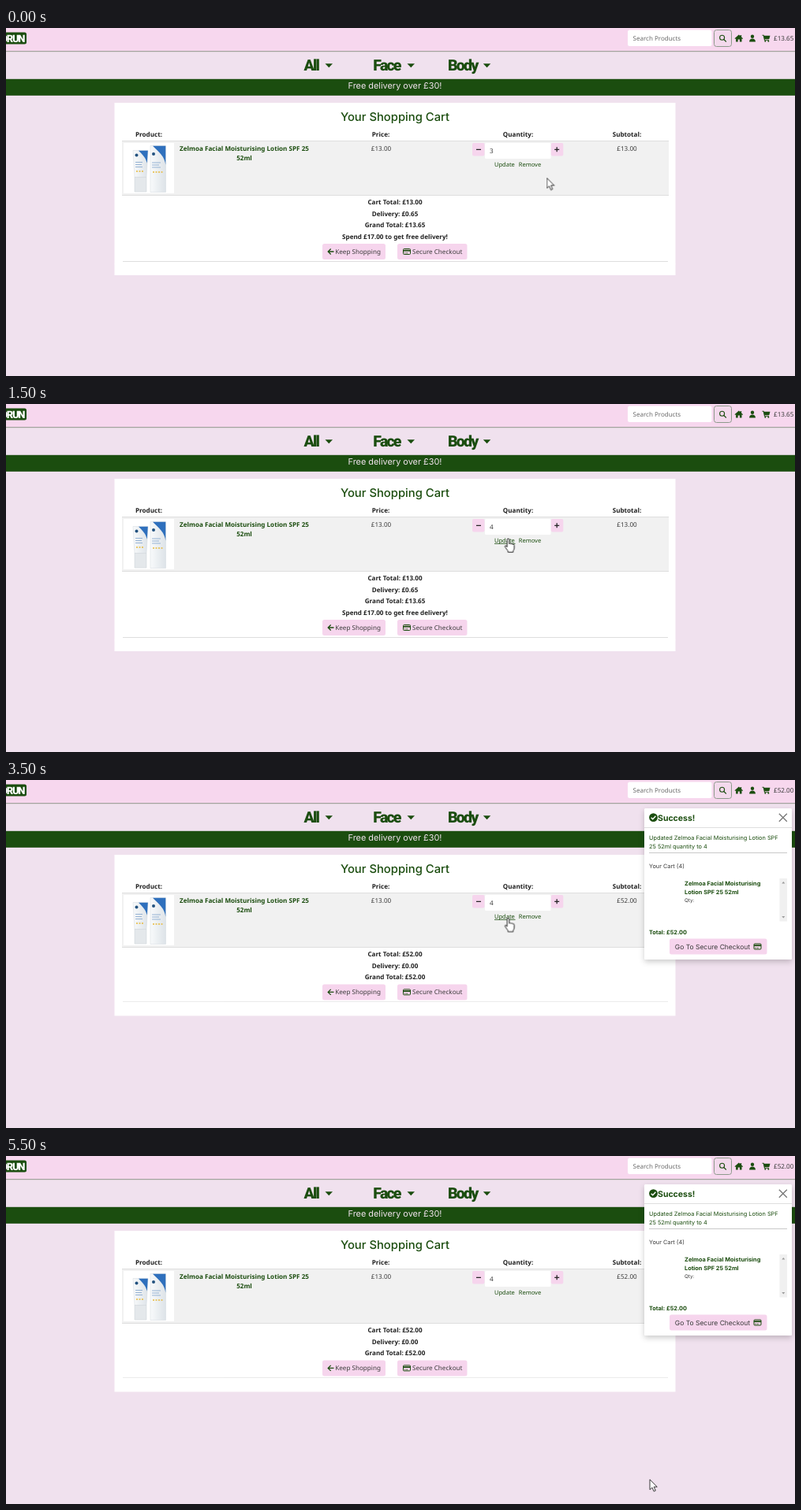
An HTML page for the animation above (5.9 s loop, 1000x442 px).

```html
<!DOCTYPE html>
<html lang="en">
<head>
<meta charset="utf-8">
<title>Shopping cart</title>
<style>
  html, body { margin: 0; height: 100%; overflow: hidden; background: #f0e1ee; }
  svg { display: block; width: 100vw; height: 100vh; }
  text { font: 8.1px "Noto Sans", "Open Sans", sans-serif; fill: #3c3c3c; text-rendering: geometricPrecision; }
  .mid { text-anchor: middle; }
  .bold { font-weight: 700; fill: #202020; }
  .link { fill: #1b4d0f; }
  .small { font-size: 7.5px; }
  .wide { font-family: Inter, sans-serif; font-size: 7.35px; }
  .heavy { font-family: Roboto, sans-serif; font-weight: 900; font-size: 19.5px; letter-spacing: -1.8px; }
  .green { fill: #1b4d0f; }
  .pink { fill: #f6d5ed; }
  .white { fill: #fff; }
  .line { fill: none; stroke: #1b4d0f; }
  .rule { fill: none; stroke: #dedede; }

  .anim { animation: 5.9s step-end infinite; }
  .before { animation-name: before; }
  .after { animation-name: after; }
  .three { animation-name: three; }
  .four { animation-name: four; }
  .plus-hover { animation-name: plus-hover; }
  .update-hover { animation-name: update-hover; }
  .hand { animation-name: hand; }
  .arrow { animation-name: arrow; }
  .actions { animation-name: actions; }
  .pointer { animation-name: pointer; }

  /* page reload at 2.4 s */
  @keyframes before { 0% { visibility: visible } 40.67%, to { visibility: hidden } }
  @keyframes after { 0% { visibility: hidden } 40.67%, to { visibility: visible } }
  @keyframes actions { 0% { transform: none } 40.67%, to { transform: translateY(-14.6px) } }
  /* click on plus at 0.9 s */
  @keyframes three { 0% { visibility: visible } 15.25%, to { visibility: hidden } }
  @keyframes four { 0% { visibility: hidden } 15.25%, to { visibility: visible } }
  @keyframes plus-hover { 0%, 20.33%, to { visibility: hidden } 6.77% { visibility: visible } }
  @keyframes update-hover { 0%, 62.7%, to { visibility: hidden } 23.72% { visibility: visible } }
  @keyframes hand { 0%, 62.7%, to { visibility: hidden } 6.77% { visibility: visible } }
  @keyframes arrow { 0%, 62.7%, to { visibility: visible } 6.77% { visibility: hidden } }
  /* one step per 100 ms while the pointer travels */
  @keyframes pointer {
    0% { transform: translate(685.5px, 190.5px); animation-timing-function: steps(4) }
    6.77% { transform: translate(697.5px, 154px) }
    18.63% { transform: translate(697.5px, 154px); animation-timing-function: steps(3) }
    23.72% { transform: translate(636.5px, 171px) }
    27.11% { transform: translate(636.5px, 171px); animation-timing-function: steps(2) }
    30.5% { transform: translate(636.5px, 175.5px) }
    61% { transform: translate(636.5px, 175.5px); animation-timing-function: steps(6) }
    71.18% { transform: translate(815px, 414.5px) }
    81.35% { transform: translate(815px, 414.5px); animation-timing-function: steps(3) }
    86.43%, to { transform: translate(816px, 410.8px) }
  }
</style>
</head>
<body>
<svg viewBox="0 0 1000 442" preserveAspectRatio="none">
  <defs>
    <symbol id="card-icon" viewBox="0 0 10 8" overflow="visible">
      <rect class="line" x=".5" y=".5" width="9" height="7" rx="1"/>
      <path class="green" d="M.5 1.8h9v1.8h-9z"/>
      <path class="line" stroke-width=".8" d="M1.8 5.8h1.5M4.2 5.8h2"/>
    </symbol>
    <path id="caret" class="green" d="M0 0h9.5L4.75 5z"/>
    <filter id="shadow" x="-10%" y="-10%" width="120%" height="120%">
      <feDropShadow dx="0" dy="3" stdDeviation="3.5" flood-opacity=".2"/>
    </filter>
    <linearGradient id="pack">
      <stop stop-color="#f8fafb"/>
      <stop offset="1" stop-color="#dde3e8"/>
    </linearGradient>
  </defs>

  <rect width="1000" height="442" fill="#f0e1ee"/>

  <!-- top bar -->
  <rect class="pink" width="1000" height="29.5" style="fill:#f7d7ee"/>
  <path d="M0 29.7h1000" stroke="#8f958c"/>
  <rect class="green" x="-4" y="5.5" width="30" height="15" rx="2.5"/>
  <text class="heavy white" x="23.2" y="18" text-anchor="end" style="font-size:13px;letter-spacing:-1.3px;fill:#fff">DRUN</text>
  <rect class="white" x="788" y="2.5" width="106.5" height="20.5" rx="2.5"/>
  <text x="794.5" y="16" style="fill:#6c6c6c;font-size:8px">Search Products</text>
  <rect x="897.5" y="2.5" width="22" height="21" rx="3" fill="#f3d9ec" stroke="#8d9a8b"/>
  <g class="line" stroke-width="1.1">
    <circle cx="907.6" cy="12.2" r="3"/>
    <path d="M909.8 14.5l3 3"/>
  </g>
  <g class="green">
    <path d="M923.5 13.2l5.3-4.8 1.9 1.7V8.9h1.4v2.5l2 1.8-.7.8-.9-.7V17.500h-2.600v-3h-2.200v3h-2.600v-4.200l-.9.700z"/>
    <circle cx="946" cy="10.700" r="2.200"/>
    <path d="M942 17.500c0-5.500 8-5.500 8 0z"/>
    <path d="M958.500 8.700h2l.4 1h7.600l-1.200 4.200h-5.500l.2.900h5v1h-6l-1.300-6.100h-1.200z"/>
    <circle cx="962.300" cy="16.800" r="1"/>
    <circle cx="966.300" cy="16.800" r="1"/>
  </g>
  <text class="before anim" x="973" y="16.200">£13.65</text>
  <text class="after anim" x="973" y="16.200">£52.00</text>

  <!-- navigation -->
  <g class="mid">
    <text class="heavy green" x="386.800" y="54">All</text>
    <text class="heavy green" x="482.500" y="54">Face</text>
    <text class="heavy green" x="578.800" y="54">Body</text>
  </g>
  <use href="#caret" x="404.500" y="45.300"/>
  <use href="#caret" x="508.500" y="45.300"/>
  <use href="#caret" x="604.800" y="45.300"/>
  <rect class="green" y="64.800" width="1000" height="21"/>
  <text class="wide mid" x="493" y="77" style="font-size:10.900px;fill:#f3e4ef">Free delivery over £30!</text>

  <!-- cart -->
  <rect class="white" x="137.500" y="95" width="711" height="204.500"/>
  <rect class="white before anim" x="137.500" y="299" width="711" height="15"/>
  <text class="wide mid green" x="493" y="117.500" style="font-size:14.800px;font-weight:500;fill:#1b4d0f">Your Shopping Cart</text>
  <g class="mid">
    <text class="bold" x="181" y="137.500">Product:</text>
    <text class="bold" x="475" y="137.500">Price:</text>
    <text class="bold" x="649" y="137.500">Quantity:</text>
    <text class="bold" x="787" y="137.500">Subtotal:</text>
  </g>
  <rect x="147" y="143.500" width="693" height="69" fill="#f1f1f1"/>
  <path class="rule" d="M147 143.500h693M147 212.500h693"/>

  <rect class="white" x="149" y="146" width="64" height="64"/>
  <g>
    <path fill="url(#pack)" stroke="#d3d9de" stroke-width=".5" d="M161 155.500h19l-2 34h-15z"/>
    <path fill="#2f70bd" d="M168 155.700h11.800l-1 16c-2-8-6-11-10.800-16z"/>
    <path fill="#e4e8eb" stroke="#cbd1d6" stroke-width=".5" d="M163 189.500h15v18.500h-15z"/>
    <path fill="url(#pack)" stroke="#d3d9de" stroke-width=".5" d="M183 149.500h19.500v59H183z"/>
    <path fill="#2f70bd" d="M186 149.700h16.300v24c-1-10-8-16-16.300-24z"/>
    <circle cx="165.500" cy="161.500" r="2" fill="#23527f"/>
    <circle cx="187" cy="160" r="2" fill="#23527f"/>
    <path fill="none" stroke="#7fa3cb" stroke-width=".8" d="M164 170.500h9M164 173.500h8M164 176.500h9M185 171h11M185 174h9M185 177h11"/>
    <path stroke="#e7bb3c" stroke-width="1.500" stroke-dasharray="2 1.500" d="M165 182h10M186 183h13"/>
  </g>

  <text class="bold mid link" x="302" y="155.500" style="fill:#1b4d0f">Zelmoa Facial Moisturising Lotion SPF 25</text>
  <text class="bold mid link" x="302" y="168.300" style="fill:#1b4d0f">52ml</text>
  <text class="mid" x="475.500" y="155.500">£13.00</text>
  <text class="mid before anim" x="787" y="155.500">£13.00</text>
  <text class="mid after anim" x="787" y="155.500">£52.00</text>

  <rect class="pink" x="591" y="146" width="15.500" height="16.500" rx="2"/>
  <rect class="white" x="607" y="146" width="83.500" height="20" rx="1.500"/>
  <rect class="pink" x="690.800" y="146" width="15.500" height="16.500" rx="2"/>
  <rect class="plus-hover anim" x="691.300" y="146.300" width="14.500" height="16" rx="2" fill="#f3f0f3" stroke="#30362f"/>
  <path stroke="#262626" stroke-width="1.300" d="M596 154.300h6M695.200 154.300h6M698.200 151.300v6"/>
  <text class="three anim" x="613" y="159.200">3</text>
  <text class="four anim" x="613" y="159.200">4</text>
  <text class="link small" x="619" y="176">Update</text>
  <path class="line update-hover anim" stroke-width=".8" d="M619 177.400h26.500"/>
  <text class="link small" x="649.800" y="176">Remove</text>

  <!-- totals -->
  <g class="mid before anim">
    <text class="bold" x="493" y="223.500">Cart Total: £13.00</text>
    <text class="bold" x="493" y="238.500">Delivery: £0.65</text>
    <text class="bold" x="493" y="253">Grand Total: £13.65</text>
    <text class="bold" x="493" y="267.500">Spend £17.00 to get free delivery!</text>
  </g>
  <g class="mid after anim">
    <text class="bold" x="493" y="223.500">Cart Total: £52.00</text>
    <text class="bold" x="493" y="238.500">Delivery: £0.00</text>
    <text class="bold" x="493" y="253">Grand Total: £52.00</text>
  </g>
  <g class="actions anim">
    <rect class="pink" x="401" y="274" width="80" height="20" rx="2.500"/>
    <path class="line" stroke-width="1.300" d="M415.500 284h-7M411.700 280.500l-3.500 3.500 3.500 3.500"/>
    <text x="417.300" y="287">Keep Shopping</text>
    <rect class="pink" x="496" y="274" width="88.500" height="20" rx="2.500"/>
    <use href="#card-icon" x="503" y="280" width="10" height="8"/>
    <text x="515" y="287">Secure Checkout</text>
    <path class="rule" d="M148 296.500h691"/>
  </g>

  <!-- success message -->
  <g class="after anim">
    <rect class="white" x="809" y="36" width="187" height="192" rx="1.500" filter="url(#shadow)"/>
    <path class="rule" d="M809 60.500h187"/>
    <circle class="green" cx="820.500" cy="47.600" r="5.400"/>
    <path fill="none" stroke="#fff" stroke-width="1.400" d="M817.700 47.800l2 2 3.700-4"/>
    <text class="wide bold" x="826" y="51.500" style="font-size:10.500px;fill:#1b4d0f">Success!</text>
    <path stroke="#777" stroke-width="1.300" d="M979.800 42.800l10 10M989.800 42.800l-10 10"/>
    <text class="wide link" x="815" y="75.700">Updated Zelmoa Facial Moisturising Lotion SPF</text>
    <text class="wide link" x="815" y="87.200">25 52ml quantity to 4</text>
    <path class="rule" stroke-width="1.200" d="M815 92.500h175" style="stroke:#c9c9c9"/>
    <text class="wide" x="815" y="111.700">Your Cart (4)</text>
    <text class="wide bold" x="860" y="134" style="fill:#1b4d0f">Zelmoa Facial Moisturising</text>
    <text class="wide bold" x="860" y="145.300" style="fill:#1b4d0f">Lotion SPF 25 52ml</text>
    <text class="wide" x="860" y="154.800" style="font-size:6.300px">Qty:</text>
    <rect x="980.500" y="125" width="9.500" height="54.500" fill="#f0f0f0"/>
    <path fill="#9a9a9a" d="M983.300 131.500h4l-2-2.500zM983.300 173h4l-2 2.500z"/>
    <text class="wide bold" x="815" y="196.300" style="fill:#1b4d0f">Total: £52.00</text>
    <rect class="pink" x="841" y="201.500" width="123.500" height="20" rx="2.500"/>
    <text class="wide" x="847.800" y="214.500" style="font-size:8.500px">Go To Secure Checkout</text>
    <use href="#card-icon" x="947.500" y="207.500" width="10" height="8"/>
  </g>

  <g class="pointer anim" fill="#fff" stroke="#222" stroke-linejoin="round">
    <path class="arrow anim" stroke-width=".9" d="M0 0v13l3-2.700 2.100 4.800 2.200-1-2.100-4.700h4z"/>
    <path class="hand anim" stroke-width="1" d="M-1.300 1.300a1.300 1.300 0 0 1 2.600 0V6.500q1.200-.9 2.300.2 1.300-.7 2.200.5 1.700-.5 1.900 1.300v3.500q0 2-1.400 3.500v1.700H-.3v-1.500L-4 10.500q-.5-1.500 1-1.600l1.700 1.600z"/>
  </g>
</svg>
</body>
</html>
```
